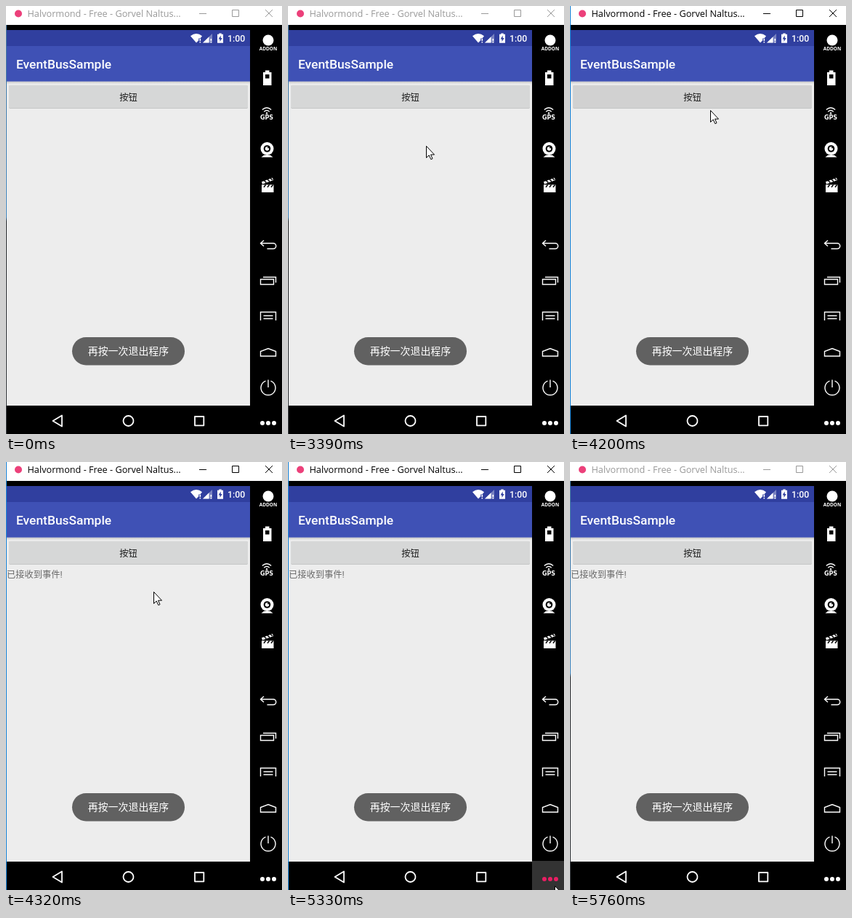
These frames come from a looping animation (380 px wide and 588 px high, 5.86 s). An HTML page:

```html
<!DOCTYPE html>
<html lang="zh-CN">
<head>
<meta charset="utf-8">
<title>EventBusSample</title>
<style>
html, body { margin: 0; width: 100%; height: 100%; overflow: hidden; background: #000; }
svg { display: block; width: 380px; height: 588px; }
text { font-family: Roboto, "Noto Sans CJK SC", "Noto Sans CJK", sans-serif; }
.caption { font: 12.7px "Open Sans", "Noto Sans", sans-serif; }
.label { font: 700 6.500px "Open Sans", "Noto Sans", sans-serif; fill: #fff; text-anchor: middle; }
.gps { font: 700 8px "DejaVu Sans", sans-serif; }
.line { fill: none; stroke: #fff; stroke-width: 1.4; }
.nav { fill: none; stroke: #fff; stroke-width: 1.8; stroke-linejoin: round; }

.frame, .edge, .press, .result, .cursor, .more, .hover {
  animation: 5860ms step-end infinite;
}
.frame { color: #999; animation-name: focus; }
.edge { opacity: 0; animation-name: edge; }
.press { fill: #d6d7d7; animation-name: press; }
.result { opacity: 0; animation-name: result; }
.cursor { opacity: 0; animation-name: cursor; }
.more { fill: #fff; animation-name: more; }
.hover { opacity: 0; animation-name: hover; }

@keyframes focus { 0%, 98.293% { color: #999; } 67.064% { color: #000; } }
@keyframes edge { 0%, 98.293% { opacity: 0; } 67.064% { opacity: 1; } }
@keyframes press { 0%, 73.719% { fill: #d6d7d7; } 71.671% { fill: #d1d1d1; } }
@keyframes result { 0% { opacity: 0; } 73.719%, 100% { opacity: 1; } }
@keyframes more { 0%, 93.514% { fill: #fff; } 90.955% { fill: #e91e63; } }
@keyframes hover { 0%, 93.514% { opacity: 0; } 90.955% { opacity: 1; } }
@keyframes cursor {
  0% { opacity: 0; transform: translate(267px, 280px); }
  53.241% { opacity: 1; transform: translate(267px, 280px); }
  55.801% { opacity: 1; transform: translate(232px, 238px); }
  57.849% { opacity: 1; transform: translate(190px, 192px); }
  60.409% { opacity: 1; transform: translate(189px, 160px); }
  62.456% { opacity: 1; transform: translate(191px, 134px); }
  64.504% { opacity: 1; transform: translate(193px, 124px); }
  71.671% { opacity: 1; transform: translate(193px, 143px); }
  73.719% { opacity: 1; transform: translate(203px, 178px); }
  75.767% { opacity: 1; transform: translate(240px, 247px); }
  78.327% { opacity: 1; transform: translate(284px, 319px); }
  80.886% { opacity: 0; transform: translate(284px, 319px); }
  90.955% { opacity: 1; transform: translate(367px, 582px); }
  93.514%, 100% { opacity: 0; transform: translate(367px, 582px); }
}
</style>
</head>
<body>
<svg viewBox="0 0 380 588">
  <defs>
    <linearGradient id="shade" x2="0" y2="1">
      <stop stop-color="#c8c8c8"/><stop offset="1" stop-color="#ededed"/>
    </linearGradient>
    <linearGradient id="behind" x2="0" y2="1">
      <stop stop-color="#41759f"/><stop offset=".47" stop-color="#3f86c0"/>
      <stop offset=".48" stop-color="#25282c"/><stop offset="1" stop-color="#34383c"/>
    </linearGradient>
  </defs>

  <!-- window -->
  <rect width="380" height="588"/>
  <rect width="380" height="26" fill="#fff"/>
  <g class="frame">
    <text class="caption" x="29.500" y="15" fill="currentColor">Halvormond - Free - Gorvel Naltus...</text>
    <path d="M266 10.500h10M311.500 5.500h9v9h-9zM357 5l10 10m0-10l-10 10" fill="none" stroke="currentColor"/>
  </g>
  <circle cx="17" cy="10.500" r="5" fill="#ec407a"/>

  <!-- phone screen -->
  <rect x="1" y="33" width="335" height="516" fill="#ededed"/>
  <rect x="1" y="33" width="335" height="22" fill="#303f9f"/>
  <rect x="1" y="55" width="335" height="48.800" fill="#3f51b5"/>
  <rect x="1" y="103.800" width="335" height="3.500" fill="url(#shade)"/>
  <text x="14" y="86" font-size="17.400" font-weight="500" fill="#fff">EventBusSample</text>

  <!-- status bar -->
  <g fill="#fff">
    <path d="M254 41.200q8-6.400 16 0l-2.500 3.200h-2.300v2.800L262 50.500z"/>
    <path d="M266.500 45h1.600v3h-1.600zm0 4h1.600v1.500h-1.600z"/>
    <path d="M271 50.500L284 38v12.500z" opacity=".35"/>
    <path d="M271 50.500L279.500 42.300v8.200z"/>
    <path d="M281.500 45h1.600v3h-1.600zm0 4h1.600v1.500h-1.600z"/>
    <path d="M293.300 37.500h3.400v1.300h2.300v12h-8v-12h2.300z"/>
    <path d="M295.700 40.500l-3.200 5h2v3.600l3.200-5h-2z" fill="#303f9f"/>
    <text x="305" y="49" font-size="12.250" font-weight="500">1:00</text>
  </g>

  <!-- button, message and toast -->
  <rect x="4" y="109" width="329" height="32" rx="2" fill="#bfc0c0"/>
  <rect class="press" x="4" y="108.700" width="329" height="31.600" rx="2"/>
  <text x="168.500" y="129.500" font-size="12.250" font-weight="500" text-anchor="middle" fill="#1c1c1c">按钮</text>
  <text class="result" x="1" y="158.500" font-size="12.250" fill="#696969">已接收到事件!</text>
  <rect x="91" y="455" width="155" height="38.400" rx="19.200" fill="#616161"/>
  <text x="168.500" y="479.300" font-size="13.950" text-anchor="middle" fill="#fff">再按一次退出程序</text>

  <!-- navigation bar -->
  <g class="nav">
    <path d="M64.500 570L77 562.500v15z"/>
    <circle cx="168.500" cy="570" r="7"/>
    <path d="M260 564h12.300v12.300H260z"/>
  </g>

  <!-- tool strip -->
  <circle cx="361" cy="47" r="7.500" fill="#fff"/>
  <text class="label" x="361" y="61">ADDON</text>

  <path d="M357 88.500h5.500v2.500h3v18h-11.500v-18h3zM357 94v5.500h5.500v-5.500z" fill="#fff" fill-rule="evenodd"/>

  <path class="line" d="M352.800 142.500q6.200-5.400 12.400 0M355.200 145.200q3.800-3.200 7.600 0"/>
  <circle cx="359" cy="147.300" r="1.200" fill="#fff"/>
  <text class="label gps" x="359" y="156">GPS</text>

  <circle cx="359.500" cy="196" r="9" fill="#fff"/>
  <circle cx="359.500" cy="196" r="4.800"/>
  <circle cx="359.500" cy="196" r="2.700" fill="#fff"/>
  <circle cx="361" cy="194.500" r="1"/>
  <path d="M355 205h9l3.500 2.800h-16z" fill="#fff"/>

  <g fill="#fff">
    <path d="M352 241.500l15-5.500 1 3.300-15 5.500z"/>
    <path d="M352 245.500h16.500V256H352z"/>
  </g>
  <path d="M355.500 240l3 2.600M360 238.300l3 2.600M364.300 236.700l2.500 2.300M355 249l2.600-3.500M360 249l2.600-3.500M365 249l2.600-3.500" stroke="#000" stroke-width="1.400"/>

  <g class="line">
    <path d="M355 322l-4.500 4 4.500 4M350.500 326H368a3.500 3.500 0 0 1 0 7.500h-8.500"/>
    <path d="M350.500 375.500h18v7h-18zM354 372.500h17.500v7.500"/>
    <path d="M350.500 432V420.500h21V432M354.500 425.500h13M354.500 429.500h13"/>
    <path d="M350.500 481v-6.500l10.500-4 10.500 4v6.500z"/>
    <path d="M357.500 515.200a10 10 0 1 0 7 0M361 513.500v10.500"/>
  </g>

  <rect class="hover" x="336" y="548" width="44" height="40" fill="#333"/>
  <g class="more">
    <circle cx="353" cy="573" r="3"/>
    <circle cx="361" cy="573" r="3"/>
    <circle cx="369" cy="573" r="3"/>
  </g>

  <!-- window edge and pointer -->
  <rect y="26" width="1" height="562" fill="url(#behind)"/>
  <rect class="edge" width="1" height="588" fill="#1883d7"/>
  <path class="cursor" d="M.500.500v16l3.700-3.500 2.600 5.700 2.200-1-2.500-5.500h5z" fill="#fff" stroke="#000"/>
</svg>
</body>
</html>
```
